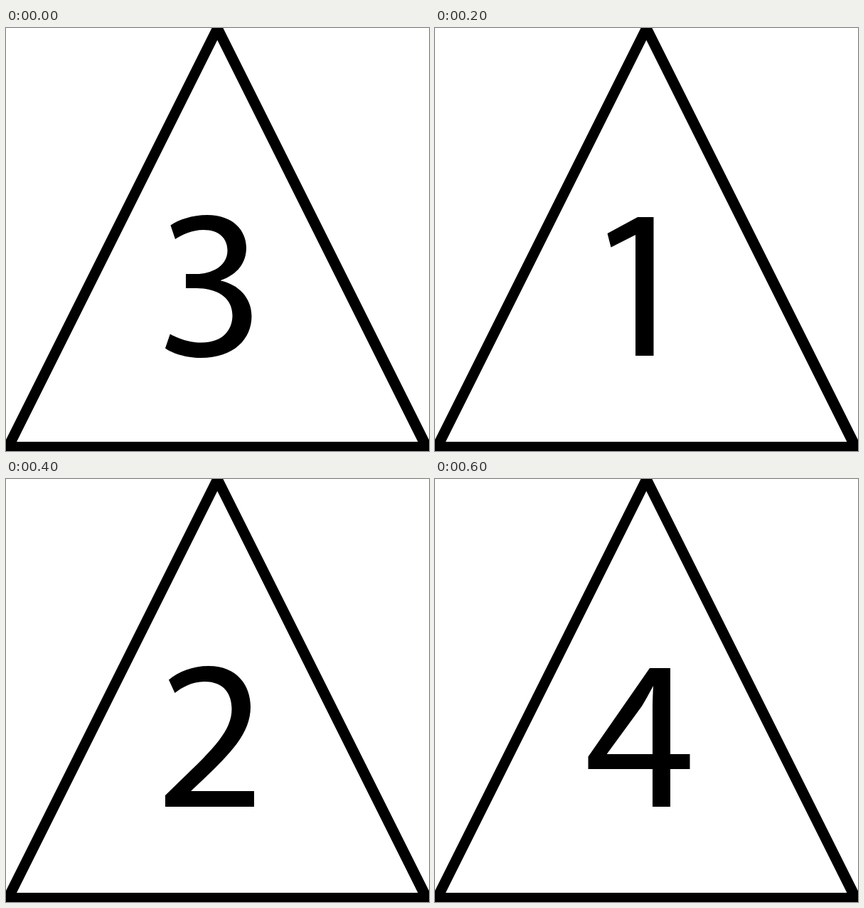
An HTML page with a canvas that plays this animation: 595x595 px, repeating every 800 ms.

```html
<!DOCTYPE html>
<html lang="en">
<head>
<meta charset="utf-8">
<title>Counting triangle</title>
<style>
  html, body { margin: 0; width: 100%; height: 100%; overflow: hidden; background: #fff; }
  canvas { display: block; }
</style>
</head>
<body>
<canvas id="stage" width="595" height="595"></canvas>
<script>
const ctx = document.getElementById('stage').getContext('2d');
const STEP = 200;

const triangle = new Path2D(
  'M0 595V579L289.5 0H305.4L595 579.2V595Z M297.3 17L15 582H579.4Z');

const digits = {
  1: 'M282 291L247.5 308.5L242.5 289L285 266H307.5V461H282Z',
  2: 'M224 461V445L244.5 425C294 378 317.5 353 317.5 323.5C317.5 304 308 285 279 285' +
     'C261.5 285 247 293.5 237.5 301L229 282.5C243 271 262 263 285 263' +
     'C326 263 344 291.5 344 320.5C344 357.5 316 386 276 424L260.5 438.5V439H349V461Z',
  3: 'M224 450.5L230.8 430.5C238 434.5 255 442.5 274.5 442.5C309 442.5 318.5 420.5 318.5 404.5' +
     'C318.5 377 294 366 268 366H253V346H268C287.5 346 311.5 336 311.5 313' +
     'C311.5 297.5 301.5 284 277.5 284C262 284 247 291 238 297L231.5 277.5' +
     'C242 270 262 263 283 263C320 263 338 285.5 338 309' +
     'C338 329.5 326.5 346.5 302 355V355.5C326 360.5 345.5 378.5 345.5 405.5' +
     'C345.5 437 321 464 274 464C252 464 233 457 224 450.5Z',
  4: 'M306 461V408H215.5V390.5L302 266H331V387H358.5V408H331V461Z' +
     'M306 387V322C306 312 306.5 301 307 291C301 302 296.5 310.5 291 319.5L242 386.5V387Z'
};
const sequence = [3, 1, 2, 4].map(n => new Path2D(digits[n]));

function draw(time) {
  const index = Math.floor(time / STEP) % sequence.length;
  ctx.fillStyle = '#fff';
  ctx.fillRect(0, 0, 595, 595);
  ctx.fillStyle = '#000';
  ctx.fill(triangle, 'evenodd');
  ctx.fill(sequence[index], 'evenodd');
}

const start = performance.now();
function tick() {
  draw(performance.now() - start);
  requestAnimationFrame(tick);
}
tick();
</script>
</body>
</html>
```
